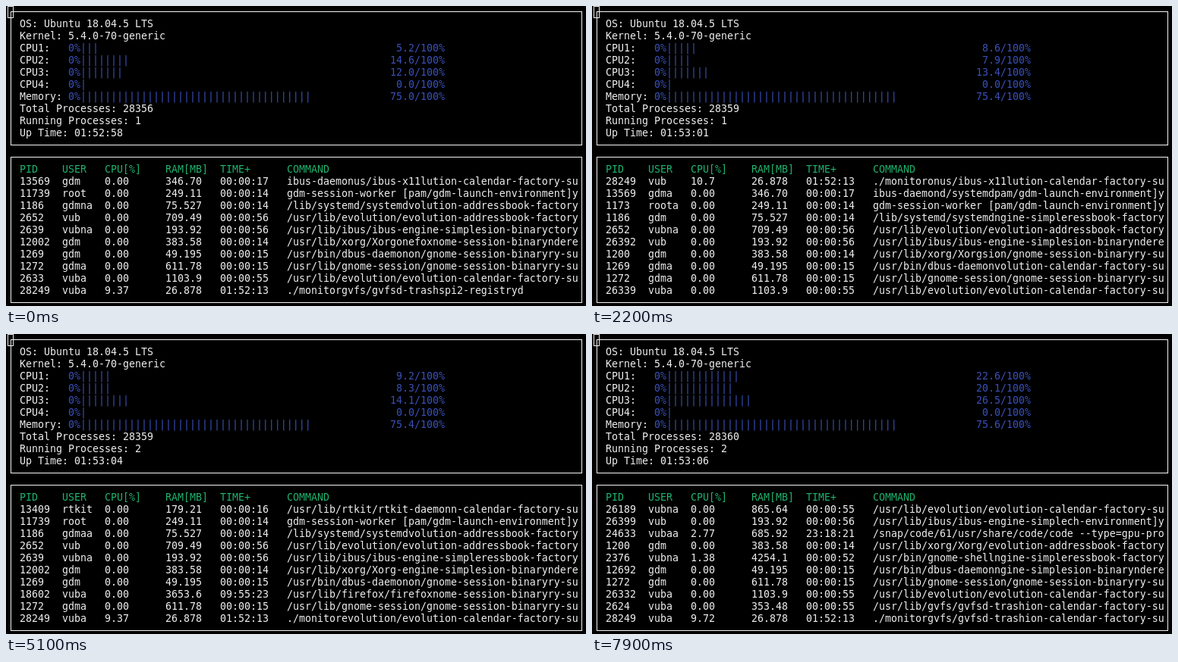
Animation of 764 by 396 pixels, one loop 8000 ms. Source, as an HTML page:

```html
<!DOCTYPE html>
<html lang="en">
<head>
<meta charset="utf-8">
<title>System monitor</title>
<style>
  html, body { margin: 0; width: 100%; height: 100%; overflow: hidden; background: #000; }
  svg { display: block; }
  text { font: 13.29px "DejaVu Sans Mono", monospace; fill: #eee; white-space: pre; }
  .blue { fill: #3a50b8; }
  .green { fill: #1fb26d; }
  .line { fill: none; stroke: #f4f4f4; stroke-width: 1; }
</style>
</head>
<body>
<svg width="764" height="396" viewBox="0 0 764 396">
  <rect width="764" height="396" fill="#000"/>
  <rect class="line" x="6.5" y="7.5" width="752" height="176"/>
  <rect class="line" x="6.5" y="199.5" width="752" height="192"/>
  <g id="stats"></g>
  <g id="procs"></g>
  <rect id="cursor" class="line" width="7" height="15"/>
  <path id="beam" class="line" d="M55 1.5H61M58.5 1.5V14.5M55 14.5H61"/>
</svg>
<script>
const LOOP = 8000;
const STATS_AT = [0, 500, 1800, 3200, 4700, 6500, 7500];
const PROCS_AT = [0, 800, 2200, 3700, 5100, 6500, 7900];
const COLS = [2, 9, 16, 26, 35, 46];

// cpu1 cpu2 cpu3 cpu4 memory, processes, running, up time
const STATS = [
  '5.2 14.6 12.0 0.0 75.0 28356 1 01:52:58',
  '7.9 9.9 14.3 0.0 75.4 28359 1 01:52:59',
  '8.6 7.9 13.4 0.0 75.4 28359 1 01:53:01',
  '5.3 6.1 12.7 0.0 75.4 28359 1 01:53:02',
  '9.2 8.3 14.1 0.0 75.4 28359 2 01:53:04',
  '9.2 7.8 14.4 0.0 75.5 28359 1 01:53:05',
  '22.6 20.1 26.5 0.0 75.6 28360 2 01:53:06'
].map(s => s.split(' '));

const PROCS = [
`13569 gdm 0.00 346.70 00:00:17 ibus-daemonus/ibus-x11lution-calendar-factory-su
11739 root 0.00 249.11 00:00:14 gdm-session-worker [pam/gdm-launch-environment]y
1186 gdmna 0.00 75.527 00:00:14 /lib/systemd/systemdvolution-addressbook-factory
2652 vub 0.00 709.49 00:00:56 /usr/lib/evolution/evolution-addressbook-factory
2639 vubna 0.00 193.92 00:00:56 /usr/lib/ibus/ibus-engine-simplesion-binaryctory
12002 gdm 0.00 383.58 00:00:14 /usr/lib/xorg/Xorgonefoxnome-session-binaryndere
1269 gdm 0.00 49.195 00:00:15 /usr/bin/dbus-daemonon/gnome-session-binaryry-su
1272 gdma 0.00 611.78 00:00:15 /usr/lib/gnome-session/gnome-session-binaryry-su
2633 vuba 0.00 1103.9 00:00:55 /usr/lib/evolution/evolution-calendar-factory-su
28249 vuba 9.37 26.878 01:52:13 ./monitorgvfs/gvfsd-trashspi2-registryd`,
`13569 gdm 0.00 346.70 00:00:17 ibus-daemonus/ibus-x11lution-calendar-factory-su
11869 gdma 0.00 75.527 00:00:14 /lib/systemd/systemdpam/gdm-launch-environment]y
2652 vubna 0.00 709.49 00:00:56 /usr/lib/evolution/evolution-addressbook-factory
2639 vub 0.00 193.92 00:00:56 /usr/lib/ibus/ibus-engine-simpleressbook-factory
1200 gdmna 0.00 383.58 00:00:14 /usr/lib/xorg/Xorg-engine-simplesion-binaryctory
12692 gdm 0.00 49.195 00:00:15 /usr/bin/dbus-daemonefoxnome-session-binaryndere
1272 gdm 0.00 611.78 00:00:15 /usr/lib/gnome-session/gnome-session-binaryry-su
2633 vuba 0.00 1103.9 00:00:55 /usr/lib/evolution/evolution-calendar-factory-su
2624 vuba 0.00 353.48 00:00:55 /usr/lib/gvfs/gvfsd-trashion-calendar-factory-su
28249 vuba 10.9 26.878 01:52:13 ./monitorgvfs/gvfsd-trashspi2-registryd`,
`28249 vub 10.7 26.878 01:52:13 ./monitoronus/ibus-x11lution-calendar-factory-su
13569 gdma 0.00 346.70 00:00:17 ibus-daemond/systemdpam/gdm-launch-environment]y
1173 roota 0.00 249.11 00:00:14 gdm-session-worker [pam/gdm-launch-environment]y
1186 gdm 0.00 75.527 00:00:14 /lib/systemd/systemdngine-simpleressbook-factory
2652 vubna 0.00 709.49 00:00:56 /usr/lib/evolution/evolution-addressbook-factory
26392 vub 0.00 193.92 00:00:56 /usr/lib/ibus/ibus-engine-simplesion-binaryndere
1200 gdm 0.00 383.58 00:00:14 /usr/lib/xorg/Xorgsion/gnome-session-binaryry-su
1269 gdma 0.00 49.195 00:00:15 /usr/bin/dbus-daemonvolution-calendar-factory-su
1272 gdma 0.00 611.78 00:00:15 /usr/lib/gnome-session/gnome-session-binaryry-su
26339 vuba 0.00 1103.9 00:00:55 /usr/lib/evolution/evolution-calendar-factory-su`,
`13569 gdm 0.00 346.70 00:00:17 ibus-daemonus/ibus-x11lution-calendar-factory-su
11869 gdma 0.00 75.527 00:00:14 /lib/systemd/systemdpam/gdm-launch-environment]y
2652 vubaa 0.00 709.49 00:00:56 /usr/lib/evolution/evolution-addressbook-factory
2376 vub 0.00 4190.3 00:00:52 /usr/bin/gnome-shellngine-simpleressbook-factory
2639 vubna 0.00 193.92 00:00:56 /usr/lib/ibus/ibus-engine-simpleressbook-factory
12002 gdm 0.00 383.58 00:00:14 /usr/lib/xorg/Xorg-engine-simplesion-binaryndere
1269 gdm 0.00 49.195 00:00:15 /usr/bin/dbus-daemonon/gnome-session-binaryry-su
1272 gdma 0.00 611.78 00:00:15 /usr/lib/gnome-session/gnome-session-binaryry-su
2633 vuba 0.00 1103.9 00:00:55 /usr/lib/evolution/evolution-calendar-factory-su
28249 vuba 8.82 26.878 01:52:13 ./monitorevolution/evolution-calendar-factory-su`,
`13409 rtkit 0.00 179.21 00:00:16 /usr/lib/rtkit/rtkit-daemonn-calendar-factory-su
11739 root 0.00 249.11 00:00:14 gdm-session-worker [pam/gdm-launch-environment]y
1186 gdmaa 0.00 75.527 00:00:14 /lib/systemd/systemdvolution-addressbook-factory
2652 vub 0.00 709.49 00:00:56 /usr/lib/evolution/evolution-addressbook-factory
2639 vubna 0.00 193.92 00:00:56 /usr/lib/ibus/ibus-engine-simpleressbook-factory
12002 gdm 0.00 383.58 00:00:14 /usr/lib/xorg/Xorg-engine-simplesion-binaryndere
1269 gdm 0.00 49.195 00:00:15 /usr/bin/dbus-daemonon/gnome-session-binaryry-su
18602 vuba 0.00 3653.6 09:55:23 /usr/lib/firefox/firefoxnome-session-binaryry-su
1272 gdma 0.00 611.78 00:00:15 /usr/lib/gnome-session/gnome-session-binaryry-su
28249 vuba 9.37 26.878 01:52:13 ./monitorevolution/evolution-calendar-factory-su`,
`28249 vubna 8.33 26.878 01:52:13 ./monitorrtkit/rtkit-daemonn-calendar-factory-su
13569 gdma 0.00 346.70 00:00:17 ibus-daemon-worker [pam/gdm-launch-environment]y
1186 gdmaa 0.00 75.527 00:00:14 /lib/systemd/systemdvolution-addressbook-factory
2652 vub 0.00 709.49 00:00:56 /usr/lib/evolution/evolution-addressbook-factory
2639 vubna 0.00 193.92 00:00:56 /usr/lib/ibus/ibus-engine-simpleressbook-factory
12002 gdm 0.00 383.58 00:00:14 /usr/lib/xorg/Xorg-engine-simplesion-binaryndere
1269 gdm 0.00 49.195 00:00:15 /usr/bin/dbus-daemonon/gnome-session-binaryry-su
12722 gdma 0.00 611.78 00:00:15 /usr/lib/gnome-session/gnome-session-binaryry-su
2633 vuba 0.00 1103.9 00:00:55 /usr/lib/evolution/evolution-calendar-factory-su
26249 vuba 0.00 353.48 00:00:55 /usr/lib/gvfs/gvfsd-trashion-calendar-factory-su`,
`26189 vubna 0.00 865.64 00:00:55 /usr/lib/evolution/evolution-calendar-factory-su
26399 vub 0.00 193.92 00:00:56 /usr/lib/ibus/ibus-engine-simplech-environment]y
24633 vubaa 2.77 685.92 23:18:21 /snap/code/61/usr/share/code/code --type=gpu-pro
1200 gdm 0.00 383.58 00:00:14 /usr/lib/xorg/Xorg/evolution-addressbook-factory
2376 vubna 1.38 4254.1 00:00:52 /usr/bin/gnome-shellngine-simpleressbook-factory
12692 gdm 0.00 49.195 00:00:15 /usr/bin/dbus-daemonngine-simplesion-binaryndere
1272 gdm 0.00 611.78 00:00:15 /usr/lib/gnome-session/gnome-session-binaryry-su
26332 vuba 0.00 1103.9 00:00:55 /usr/lib/evolution/evolution-calendar-factory-su
2624 vuba 0.00 353.48 00:00:55 /usr/lib/gvfs/gvfsd-trashion-calendar-factory-su
28249 vuba 9.72 26.878 01:52:13 ./monitorgvfs/gvfsd-trashion-calendar-factory-su`
];

const $ = id => document.getElementById(id);
const stats = $('stats'), procs = $('procs'), cursor = $('cursor'), beam = $('beam');

// Text on the terminal grid: 8 x 16 px cells
const put = (col, row, str, cls = '') =>
  `<text class="${cls}" x="${2 + col * 8}" y="${row * 16 + 12}">${str}</text>`;

function statsMarkup(s) {
  const meters = ['CPU1:', 'CPU2:', 'CPU3:', 'CPU4:', 'Memory:'].map((name, i) => {
    const value = s[i] + '/100%';
    const bars = '|'.repeat(Math.floor(s[i] / 2) + 1);
    return put(2, i + 3, name) + put(10, i + 3, '0%' + bars, 'blue') +
      put(72 - value.length, i + 3, value, 'blue');
  });
  return put(2, 1, 'OS: Ubuntu 18.04.5 LTS') + put(2, 2, 'Kernel: 5.4.0-70-generic') +
    meters.join('') + put(2, 8, 'Total Processes: ' + s[5]) +
    put(2, 9, 'Running Processes: ' + s[6]) + put(2, 10, 'Up Time: ' + s[7]);
}

function procsMarkup(list) {
  const head = ['PID', 'USER', 'CPU[%]', 'RAM[MB]', 'TIME+', 'COMMAND'];
  const rows = list.split('\n').map((line, r) => {
    const f = line.split(' ');
    return [...f.slice(0, 5), f.slice(5).join(' ')]
      .map((str, i) => put(COLS[i], r + 14, str)).join('');
  });
  return head.map((str, i) => put(COLS[i], 13, str, 'green')).join('') + rows.join('');
}

const stepAt = (times, t) => times.filter(x => x <= t).length - 1;
let shownStats = -1, shownProcs = -1;

function draw(t) {
  const a = stepAt(STATS_AT, t), b = stepAt(PROCS_AT, t);
  if (a !== shownStats) stats.innerHTML = statsMarkup(STATS[shownStats = a]);
  if (b !== shownProcs) procs.innerHTML = procsMarkup(PROCS[shownProcs = b]);
  // The cursor waits after the up time until the process list is redrawn
  const home = a === b;
  cursor.setAttribute('x', home ? 2.5 : 154.5);
  cursor.setAttribute('y', home ? 0.5 : 160.5);
  beam.setAttribute('visibility', t >= 7200 && t < 7300 ? 'visible' : 'hidden');
}

const start = performance.now();
function tick() {
  draw((performance.now() - start) % LOOP);
  requestAnimationFrame(tick);
}
tick();
</script>
</body>
</html>
```
